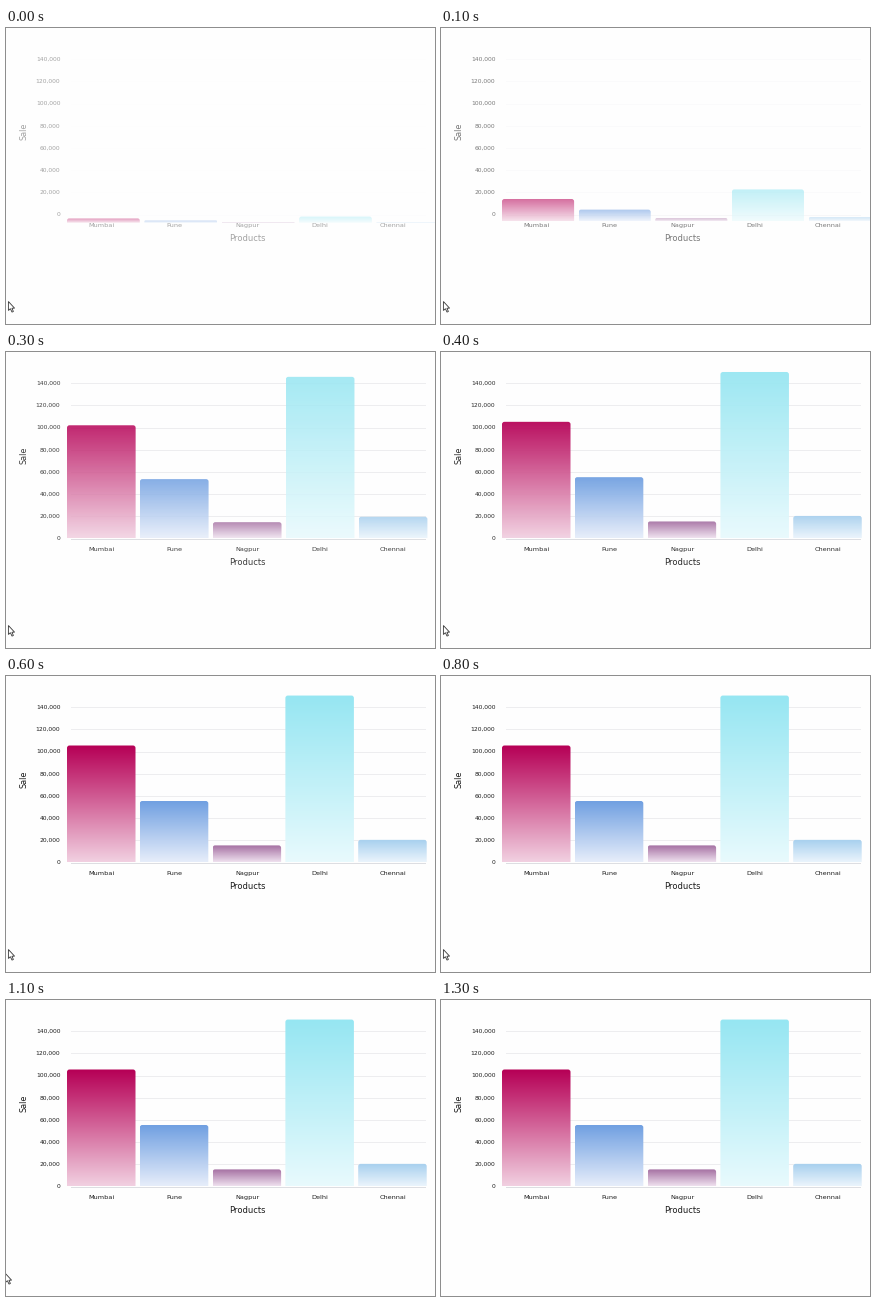
Recreate the animation shown at these times as a matplotlib script. Size 429 by 296 pixels, loop 1500 ms.

```python
import numpy as np
import matplotlib.pyplot as plt
from matplotlib.animation import FuncAnimation
from matplotlib.colors import to_rgb
from matplotlib.patches import PathPatch, Polygon
from matplotlib.path import Path

W, H, DPI = 429, 296, 100
FRAMES, STEP = 15, 100
PX = 72 / DPI
LEFT, ZERO, UNIT = 61, 186.05, 22.2 / 20000
PITCH, BAR_W, RADIUS = 72.8, 68.5, 2.5

BARS = [
    ("Mumbai", 105000, "#b60056", "#f1cfe0"),
    ("Pune", 55000, "#6f9fe1", "#e6edfa"),
    ("Nagpur", 15000, "#a570a2", "#eee0ee"),
    ("Delhi", 150000, "#96e6f2", "#e8fafd"),
    ("Chennai", 20000, "#a6cfee", "#eaf4fc"),
]

plt.rcParams["font.family"] = "DejaVu Sans"
fig = plt.figure(figsize=(W / DPI, H / DPI), dpi=DPI, facecolor="#fefefe")
ax = fig.add_axes([0, 0, 1, 1])
ax.axis("off")

labels, grid = [], []


def label(x, y, text, size, **kw):
    labels.append(ax.text(x, y, text, fontsize=size * PX, color="#1c1c1c", **kw))


def bar_path(x, top, w, base):
    """Rectangle with rounded upper corners."""
    r = min(RADIUS, (base - top) / 2)
    verts = [(x, base), (x, top + r), (x, top), (x + r, top),
             (x + w - r, top), (x + w, top), (x + w, top + r),
             (x + w, base), (x, base)]
    codes = [Path.MOVETO, Path.LINETO, Path.CURVE3, Path.CURVE3, Path.LINETO,
             Path.CURVE3, Path.CURVE3, Path.LINETO, Path.CLOSEPOLY]
    return Path(verts, codes)


for value in range(0, 140001, 20000):
    y = ZERO - value * UNIT
    line_y = np.floor(y) + 0.5
    color = "#dddee2" if value == 0 else "#ededef"
    grid += ax.plot([65, 419], [line_y, line_y], color=color, lw=PX, zorder=1)
    label(54.3, y + 2.2, f"{value:,}", 6, ha="right", va="baseline")

bars = []
for i, (name, value, top, bottom) in enumerate(BARS):
    mix = np.linspace(0, 1, 64)[:, None, None]
    ramp = (1 - mix) * np.array(to_rgb(top)) + mix * np.array(to_rgb(bottom))
    img = ax.imshow(ramp, aspect="auto", interpolation="bilinear", zorder=2)
    clip = PathPatch(bar_path(0, 0, 1, 1), transform=ax.transData)
    bars.append((i, value, img, clip))
    label(95.5 + PITCH * i, 199.2, name, 6.5, ha="center", va="baseline")

label(241, 212.6, "Products", 8.4, ha="center", va="baseline")
label(18.4, 103, "Sale", 8.1, rotation=90, ha="center", va="center")

ARROW = np.array([(0, 0), (0, 9), (2, 7.2), (3.6, 10.6), (5, 10),
                  (3.5, 6.7), (6.2, 6.7)]) + (2.4, 273.5)
cursor = Polygon(ARROW, closed=True, fc="white", ec="#3a3a3a", lw=0.85 * PX,
                 joinstyle="miter", zorder=5)
ax.add_patch(cursor)

ax.set_xlim(0, W)
ax.set_ylim(H, 0)


def draw(n):
    grow = 0.02 + 0.98 / (1 + np.exp(-2.5 * (n - 1.62)))
    alpha = 1 - 0.6 * max(0, 1 - n / 6) ** 2
    stretch = 1 + 0.065 * (1 - grow)
    base = ZERO + 9 * (1 - grow)
    for i, value, img, clip in bars:
        x, w = LEFT + PITCH * i * stretch, BAR_W * stretch
        top = base - value * UNIT * grow
        img.set_extent((x, x + w, base, top))
        clip.set_path(bar_path(x, top, w, base))
        img.set_clip_path(clip)
        img.set_alpha(alpha)
    for text in labels:
        text.set_alpha(alpha)
    for line in grid:
        line.set_alpha(grow)
    # the pointer slips out past the left edge near the end
    cursor.set_xy(ARROW - (3 * max(0, n - 10), 0))
    cursor.set_visible(n < 13)
    ax.set_xlim(0, W)
    ax.set_ylim(H, 0)
    return []


anim = FuncAnimation(fig, draw, frames=FRAMES, interval=STEP,
                     init_func=lambda: draw(0), repeat=True, repeat_delay=0)
plt.show()
```
